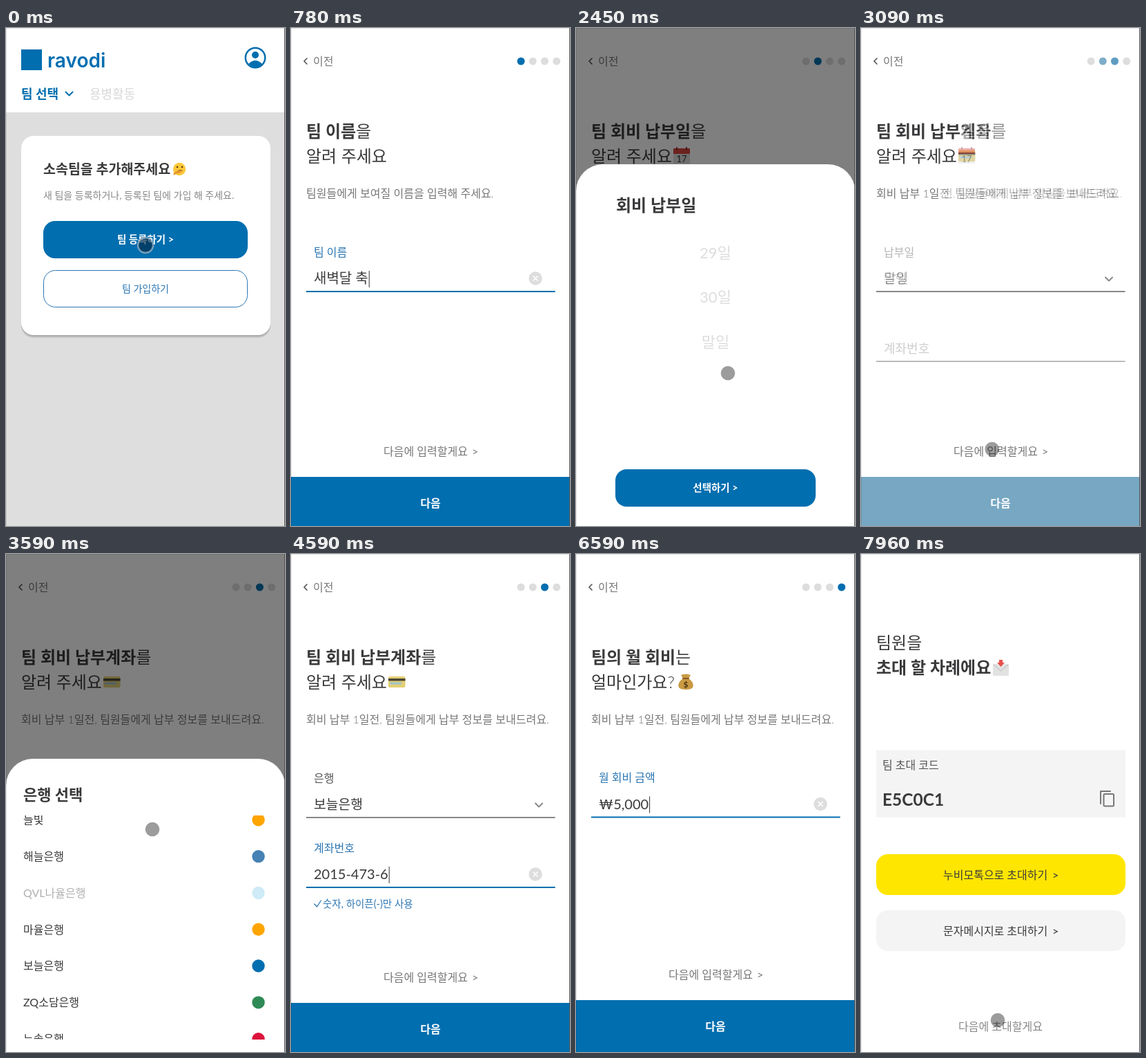
These frames come from a looping animation (404x720 px, 7990 ms). An HTML page:

```html
<!DOCTYPE html>
<html lang="ko">
<head>
<meta charset="utf-8">
<title>팀 등록</title>
<style>
html, body { margin: 0; width: 100%; height: 100%; overflow: hidden; background: #fff; }
svg { display: block; }
#stage { width: 100vw; height: 100vh; }
text { font-family: Lato, "Noto Sans CJK KR", "Noto Sans CJK", sans-serif; white-space: pre; }
</style>
</head>
<body>
<svg id="stage" viewBox="0 0 404 720"></svg>
<script>
const LOOP = 7990;
const BLUE = '#006eaf', LINK = '#2c76b3', INK = '#3a3a3c', GRAY = '#777', PALE = '#ddd';
const stage = document.getElementById('stage');
const pen = document.createElement('canvas').getContext('2d');

const clamp = v => Math.max(0, Math.min(1, v));
const span = (t, a, b) => b > a ? clamp((t - a) / (b - a)) : Number(t >= b);
const easeOut = (p, n = 3) => 1 - (1 - p) ** n;
const smooth = p => p * p * (3 - 2 * p);

// y is the vertical middle of the glyphs
const text = (x, y, s, size, fill = INK, weight = 400, anchor = 'start') =>
  `<text x="${x}" y="${y + size * 0.37}" font-size="${size}" fill="${fill}" font-weight="${weight}" text-anchor="${anchor}">${s}</text>`;
const mid = (y, s, size, fill, weight) => text(202, y, s, size, fill, weight, 'middle');
const rect = (x, y, w, h, fill, r = 0, more = '') =>
  `<rect x="${x}" y="${y}" width="${w}" height="${h}" rx="${r}" fill="${fill}" ${more}/>`;
const circle = (x, y, r, fill, more = '') => `<circle cx="${x}" cy="${y}" r="${r}" fill="${fill}" ${more}/>`;
const line = (d, color, w = 2) =>
  `<path d="${d}" fill="none" stroke="${color}" stroke-width="${w}" stroke-linecap="round" stroke-linejoin="round"/>`;
const group = (s, more) => `<g ${more}>${s}</g>`;

const icon = {
  think: () => circle(251, 204, 9.2, '#fdc83a') + circle(248, 201, 1.3, '#5b3a12') + circle(255, 201, 1.3, '#5b3a12') +
    line('M249 207q3-2 6-1', '#7a4b16', 1.2) + line('M244 211q2-3 4-2l5-2', '#e8952c', 3),
  calendar: () => rect(141, 174, 24, 22, '#dedede', 1) + rect(141, 174, 24, 8, '#d8443f', 1) +
    line('M146 173v3M160 173v3', '#8d2f2c') + text(153, 189, '17', 13, '#333', 400, 'middle'),
  card: () => rect(141, 177, 24.5, 16, '#e3cf74', 2) + rect(141, 180, 24.5, 3.5, '#4a4636') +
    rect(143, 185.5, 17, 3, '#9fc3d2'),
  bag: () => '<path d="M155 180q-9 6-6 13q2 3 10 3t10-3q3-7-6-13l3-5q-7-3-14 0z" fill="#c99a43"/>' +
    line('M155 180h8', '#8a5a22') + text(159, 188.5, '$', 12, '#4b3412', 700, 'middle'),
  mail: () => rect(191, 159, 23, 17, '#e2e2e2', 1.5) + line('M192 160l10.5 9 10.5-9', '#b5b5b5', 1) +
    '<path d="M200 153h5v4h3l-5.5 6-5.5-6h3z" fill="#e8504a"/>',
  copy: () => line('M347 361v-18h14', '#777') + rect(351.5, 347, 14.5, 17.5, 'none', 1.5, 'stroke="#777" stroke-width="2"'),
  down: (x, y, c) => line(`M${x - 5} ${y - 2.5}l5 5 5-5`, c)
};

function header(step) {
  let s = line('M23 44l-4 4 4 4', '#555', 1.7) + text(32, 48, '이전', 16, GRAY);
  for (let i = 0; i < 4; i++) s += circle(333 + i * 17.2, 48, 5.5, i === step ? BLUE : PALE);
  return s;
}

function heading(bold, tail, second, sub) {
  return `<text x="22" y="157.5" font-size="24" fill="${INK}" font-weight="700">${bold}<tspan font-weight="300">${tail}</tspan></text>` +
    text(22, 185, second, 24, INK, 300) + text(22, 239, sub, 16, GRAY, 300);
}

function field(y, label, value, { focus = false, select = false } = {}) {
  let s = rect(22, y + 56, 360.5, 2, focus ? BLUE : '#888');
  if (!value && !focus) s += text(33, y + 38, label, 18, '#aaa');
  else s += text(33, y, label, 16, focus ? LINK : '#555') + text(33, y + 38, value, select ? 19.3 : 20);
  if (select) s += icon.down(359, y + 39, '#888');
  if (focus) {
    pen.font = '20px Lato, "Noto Sans CJK KR", "Noto Sans CJK", sans-serif';
    s += rect(34 + pen.measureText(value).width, y + 27, 1, 24, '#333');
    if (value) s += circle(354, y + 38, 9.7, PALE) + line(`M351 ${y + 35}l6 6m0-6l-6 6`, '#fff', 1.7);
  }
  return s;
}

function footer(ready, y = 649) {
  return text(134, y - 37, '다음에 입력할게요', 16, GRAY) + text(262, y - 37, '&gt;', 16, GRAY) +
    rect(0, y, 404, 75, ready ? BLUE : '#d2d2d2') + mid(y + 38, '다음', 16, '#fff', 700);
}

// Slides up from the bottom edge over a darkened page
function sheet(t, [open, opened, close, closed], rest, body) {
  if (t < open || t > closed) return '';
  const k = easeOut(span(t, open, opened)) * (1 - smooth(span(t, close, closed)));
  const top = 720 - (720 - rest) * k;
  return rect(0, 0, 404, 720, '#000', 0, `opacity="${0.5 * clamp(k * 1.6)}"`) +
    group(rect(0, 0, 404, 800, '#fff', 39) + body, `transform="translate(0 ${top})"`);
}

function dayPicker(t) {
  const scroll = 30 * 64.5 * easeOut(span(t, 1890, 2557));
  let rows = '';
  for (let i = 0; i < 31; i++) {
    const y = 153 + i * 64.5 - scroll;
    if (y < -30 || y > 360) continue;
    const chosen = i === 30 && t > 2570;
    rows += mid(y, i < 30 ? `${i + 1}일` : '말일', 22, chosen ? INK : PALE);
  }
  return text(58, 59, '회비 납부일', 24, INK, 700) +
    `<svg y="96" width="404" height="335">${rows}</svg>` +
    rect(57, 441, 290, 54, BLUE, 16) + mid(468, '선택하기 &gt;', 14.5, '#fff', 700);
}

const banks = {
  들빛: 'orange', 해늘은행: 'steelblue', QVL나율은행: 'skyblue', 마율은행: 'orange', 보늘은행: BLUE,
  ZQ소담은행: 'seagreen', 누솔은행: 'crimson', 온새은행: 'teal', 가밀은행: BLUE
};

function bankPicker(t) {
  const scroll = 49 * easeOut(span(t, 3490, 3900), 2);
  const rows = Object.entries(banks).map(([name, color], i) => {
    const y = 27.5 + i * 52.8 - scroll;
    const pressed = (i === 2 && t > 3470 && t < 3740) || (i === 4 && t > 3950);
    return group(text(25, y, name, 16) + circle(365.5, y, 9.2, color), `opacity="${pressed ? 0.4 : 1}"`);
  }).join('');
  return text(25, 52, '은행 선택', 22, INK, 700) + `<svg y="82" width="404" height="324">${rows}</svg>`;
}

function home() {
  return rect(0, 122, 404, 598, '#dedede') + rect(22, 31, 30, 30, BLUE) +
    `<text x="60" y="57" font-size="28" font-weight="600" fill="${BLUE}" style="font-family:Inter,sans-serif">ravodi</text>` +
    circle(361, 43, 14.2, 'none', `stroke="${BLUE}" stroke-width="2.5"`) + circle(361, 39, 5, BLUE) +
    `<path d="M351 52q10-10 20 0q-10 9-20 0z" fill="${BLUE}"/>` +
    text(22, 95, '팀 선택', 18, BLUE, 700) + icon.down(91.5, 95, BLUE) + text(121, 95, '용병활동', 18, '#d8d8d8', 500) +
    rect(22, 160, 361, 288, '#000', 18, 'opacity=".1"') + rect(22, 158, 361, 288, '#000', 18, 'opacity=".14"') +
    rect(22, 156, 361, 288, '#fff', 18) +
    text(54, 204, '소속팀을 추가해주세요', 19.5, INK, 700) + icon.think() +
    text(54, 242, '새 팀을 등록하거나, 등록된 팀에 가입 해 주세요.', 14, '#888') +
    rect(54, 279, 296, 54, BLUE, 17) + mid(306, '팀 등록하기 &gt;', 14.5, '#fff', 700) +
    rect(54.5, 350.5, 295, 53, '#fff', 17, `stroke="${LINK}"`) + mid(377, '팀 가입하기', 14, LINK);
}

function namePage(t) {
  const value = '새벽달 축구단'.slice(0, Math.max(0, Math.floor((t - 440) / 58)));
  return header(0) + heading('팀 이름', '을', '알려 주세요', '팀원들에게 보여질 이름을 입력해 주세요.') +
    field(324, '팀 이름', value, { focus: t > 400 }) + footer(value);
}

function datePage(t) {
  const value = t > 2700 ? '말일' : '';
  return header(1) + heading('팀 회비 납부일', '을', '알려 주세요', '회비 납부 1일 전, 팀원들에게 납부 알림을 보내드려요.') +
    icon.calendar() + field(324, '납부일', value, { select: true }) + footer(value) +
    sheet(t, [1372, 1850, 2690, 2880], 197, dayPicker(t));
}

function bankPage(t) {
  const typed = t < 4650 ? Math.min(10, Math.floor((t - 4265) / 32)) : 10 + Math.floor((t - 4640) / 50);
  const account = '2015-473-620841'.slice(0, Math.max(0, typed));
  const focus = t > 4260;
  return header(2) + heading('팀 회비 납부계좌', '를', '알려 주세요', '회비 납부 1일전, 팀원들에게 납부 정보를 보내드려요.') +
    icon.card() + field(324, '은행', t > 4030 ? '보늘은행' : '', { select: true }) +
    field(425, '계좌번호', account, { focus }) +
    (focus ? line('M34 506l3.5 4 6-9', LINK, 1.3) + text(46, 506, '숫자, 하이픈(-)만 사용', 14.5, LINK) : '') +
    footer(account) + sheet(t, [3230, 3480, 4030, 4230], 296, bankPicker(t));
}

function feePage(t) {
  const digits = '50000'.slice(0, Math.max(0, Math.floor((t - 6005) / 143)));
  const value = digits && '₩' + digits.replace(/\B(?=(\d{3})+$)/g, ',');
  return header(3) + heading('팀의 월 회비', '는', '얼마인가요?', '회비 납부 1일전, 팀원들에게 납부 정보를 보내드려요.') +
    icon.bag() + field(323.5, '월 회비 금액', value, { focus: t > 5780 }) + footer(value, 645);
}

function invitePage() {
  const button = (y, fill, label) => rect(22, y, 361, 59, fill, 17) +
    text(119, y + 30, label, 16, INK, 500) + text(277, y + 30, '&gt;', 16, INK, 500);
  return text(22, 128, '팀원을', 24, INK, 300) + text(22, 164, '초대 할 차례에요', 24, INK, 700) + icon.mail() +
    rect(22, 283.5, 361, 97, '#f4f4f4') + text(31, 305, '팀 초대 코드', 16, '#555') +
    text(31, 355, 'E5C0C1', 24.5, INK, 700) + icon.copy() +
    button(434, '#ffe600', '누비모톡으로 초대하기') + button(515, '#f4f4f4', '문자메시지로 초대하기') +
    mid(683, '다음에 초대할게요', 16, '#888');
}

// [start, fade, draw]
const pages = [
  [-1, 1, home], [20, 160, namePage], [1120, 160, datePage],
  [3000, 160, bankPage], [5120, 250, feePage], [7060, 220, invitePage]
];

const spots = {
  start: [202, 314], next: [202, 685], field: [150, 362], date: [184, 357],
  low: [212, 530], high: [216, 380], rest: [220, 499], pick: [205, 664],
  drag: [212, 398], bank: [150, 568], account: [150, 463],
  share: [251, 468], bend: [165, 590], later: [198, 674]
};

// Each visit is [spot, arrival, departure]; the pointer shows during each tour
const tours = [
  [['start', -100, 300], ['field', 400, 430]],
  [['next', 900, 1150], ['date', 1340, 1700], ['low', 1880, 1880], ['high', 2080, 2080], ['rest', 2450, 2450],
    ['pick', 2600, 2720], ['next', 2880, 3050], ['field', 3180, 3300], ['drag', 3590, 3700],
    ['bank', 3930, 4050], ['account', 4200, 4270]],
  [['next', 4950, 5560], ['field', 5740, 5860]],
  [['next', 6870, 7200], ['share', 7600, 7660], ['bend', 7810, 7810], ['later', 7960, 8100]]
];

function pointer(t) {
  const tour = tours.find(v => t >= v[0][1] && t < v.at(-1)[2] + 30);
  if (!tour) return '';
  const i = tour.findLastIndex(v => t >= v[1]);
  const from = tour[i], to = tour[i + 1] || from;
  const p = to === from ? 0 : smooth(span(t, from[2], to[1]));
  const [x, y] = spots[from[0]].map((v, n) => v + (spots[to[0]][n] - v) * p);
  const alpha = span(t, tour[0][1], tour[0][1] + 60) * (1 - span(t, tour.at(-1)[2], tour.at(-1)[2] + 30));
  const dot = t < 180
    ? circle(x, y, 11, '#00223c', 'fill-opacity=".6" stroke="#9fb4c4" stroke-opacity=".75" stroke-width="2.5"')
    : circle(x, y, 10.3, '#000', 'fill-opacity=".39"');
  return group(dot, `opacity="${alpha}"`);
}

function draw(t) {
  const now = pages.findLastIndex(p => t >= p[0]);
  const [start, fade, page] = pages[now];
  const k = span(t, start, start + fade);
  let s = rect(0, 0, 404, 720, '#fff');
  if (k < 1) s += pages[now - 1][2](t);
  s += group(rect(0, 0, 404, 720, '#fff') + page(t), `opacity="${k}"`);
  s += rect(0, 0, 404, 1, '#000', 0, 'opacity=".1"') + rect(0, 0, 1, 720, '#000', 0, 'opacity=".1"') +
    rect(403, 0, 1, 720, '#555');
  stage.innerHTML = s + pointer(t);
}

const begin = performance.now();
function tick() {
  draw(Math.max(0, performance.now() - begin) % LOOP);
  requestAnimationFrame(tick);
}
tick();
</script>
</body>
</html>
```
